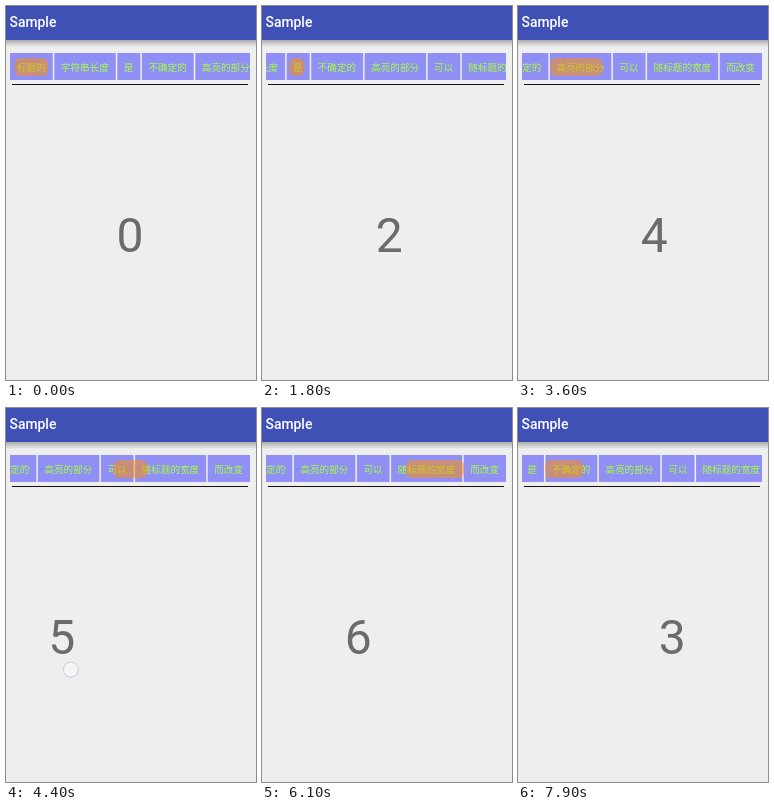
Write an HTML page with a canvas that moves like this. It is 250 by 374 pixels and loops after 8000 ms.

```html
<!DOCTYPE html>
<html lang="zh">
<head>
<meta charset="utf-8">
<style>
  html, body { margin: 0; width: 100%; height: 100%; overflow: hidden; background: #eee; }
  canvas { display: block; }
</style>
</head>
<body>
<canvas id="stage" width="250" height="374"></canvas>
<script>
const ctx = document.getElementById('stage').getContext('2d');
const LOOP = 8000, STEP = 100, LAG = 20, LONGEST_SWIPE = 850;
const PAGE = 240, LEFT = 4, RIGHT = 244, CENTER = 124;
const CHAR = 9.6, PAD = 7, GAP = 15, INSET = 2.5, MARGIN = 27;

// Tab positions before scrolling
let cursor = LEFT + PAD;
const tabs = ['标题的', '字符串长度', '是', '不确定的', '高亮的部分', '可以', '随标题的宽度', '而改变'].map(label => {
  const x = cursor, width = label.length * CHAR;
  cursor += width + GAP;
  return { label, x, width };
});
const maxScroll = cursor - GAP + PAD - RIGHT;

// Moments when the finger goes down: forward to the last page, then back
const touches = [600, 1200, 1850, 2880, 3730, 4150, 5200, 5740, 6245, 6660, 7090, 7545];
const last = tabs.length - 1;
const pageAfter = k => k < last ? k + 1 : Math.max(3, 2 * last - 1 - k);

const mix = (a, b, f) => a + (b - a) * f;
const smooth = f => f * f * (3 - 2 * f);

// Each swipe is half drag, half decelerating settle
function stateAt(t) {
  const k = touches.findLastIndex(down => down <= t);
  if (k < 0) return { page: 0 };
  const forward = k < last;
  const reach = forward ? 0.45 : -0.65;
  const duration = Math.min(LONGEST_SWIPE, (touches[k + 1] ?? LOOP) - touches[k]);
  const f = Math.min(1, (t - touches[k]) / duration);
  const from = pageAfter(k - 1);
  if (f >= 0.5) {
    const rest = 2 - 2 * f;
    return { page: mix(pageAfter(k), from + reach, rest * rest) };
  }
  const pull = smooth(2 * f);
  return {
    page: from + reach * pull,
    finger: {
      x: (forward ? 133 : 80) - reach * pull * PAGE,
      y: (forward ? 254 : 264) + 12 * pull,
      alpha: 1 - pull / 2
    }
  };
}

function fill(color, x, y, w, h) {
  ctx.fillStyle = color;
  ctx.fillRect(x, y, w, h);
}

function drawBar() {
  const shadow = ctx.createLinearGradient(0, 34, 0, 41);
  shadow.addColorStop(0, 'rgba(0,0,0,.28)');
  shadow.addColorStop(1, 'rgba(0,0,0,0)');
  fill(shadow, 0, 34, 250, 7);
  fill('#3f51b5', 0, 0, 250, 34);
  ctx.fillStyle = '#fff';
  ctx.font = '500 13.9px Roboto, sans-serif';
  ctx.textAlign = 'left';
  ctx.fillText('Sample', 3.5, 21);
}

function drawTabs(page) {
  const i = Math.floor(page), f = page - i;
  const a = tabs[i], b = tabs[Math.min(i + 1, last)];
  const left = mix(a.x, b.x, f) - INSET;
  const right = mix(a.x + a.width, b.x + b.width, f) + INSET;
  const scroll = Math.min(maxScroll, Math.max(0, left - MARGIN));

  ctx.save();
  ctx.beginPath();
  ctx.rect(LEFT, 47, RIGHT - LEFT, 27);
  ctx.clip();
  fill('#8f8ff5', LEFT, 47, RIGHT - LEFT, 27);
  ctx.translate(-scroll, 0);
  ctx.font = `${CHAR}px "Noto Sans CJK SC", "Noto Sans CJK", sans-serif`;
  ctx.textAlign = 'left';
  tabs.forEach(({ label, x }, n) => {
    if (n) fill('#f0f0f8', x - PAD - 1, 47, 1.5, 27);
    ctx.fillStyle = '#a4ff3c';
    ctx.fillText(label, x, 64.6);
  });
  ctx.fillStyle = 'rgba(255,143,0,.5)';
  ctx.beginPath();
  ctx.roundRect(left, 52, right - left, 18, 6);
  ctx.fill();
  ctx.restore();
  fill('#111', 6, 78, 236, 1);
}

function drawPages(page) {
  ctx.fillStyle = '#6b6b6b';
  ctx.font = '48px Roboto, sans-serif';
  ctx.textAlign = 'center';
  for (const n of new Set([Math.floor(page), Math.ceil(page)])) {
    ctx.fillText(n, CENTER + (n - page) * PAGE, 246);
  }
}

function drawFinger({ x, y, alpha }) {
  ctx.globalAlpha = alpha;
  ctx.beginPath();
  ctx.arc(x, y, 7.5, 0, Math.PI * 2);
  ctx.fillStyle = '#f9f9fb';
  ctx.fill();
  ctx.strokeStyle = '#b8b8c8';
  ctx.stroke();
  ctx.globalAlpha = 1;
}

function draw() {
  const t = Math.floor(performance.now() % LOOP / STEP) * STEP;
  const { page, finger } = stateAt(t);
  fill('#eee', 0, 0, 250, 374);
  drawBar();
  drawTabs(stateAt(t - LAG).page);
  drawPages(page);
  if (finger) drawFinger(finger);
  requestAnimationFrame(draw);
}
draw();
</script>
</body>
</html>
```
